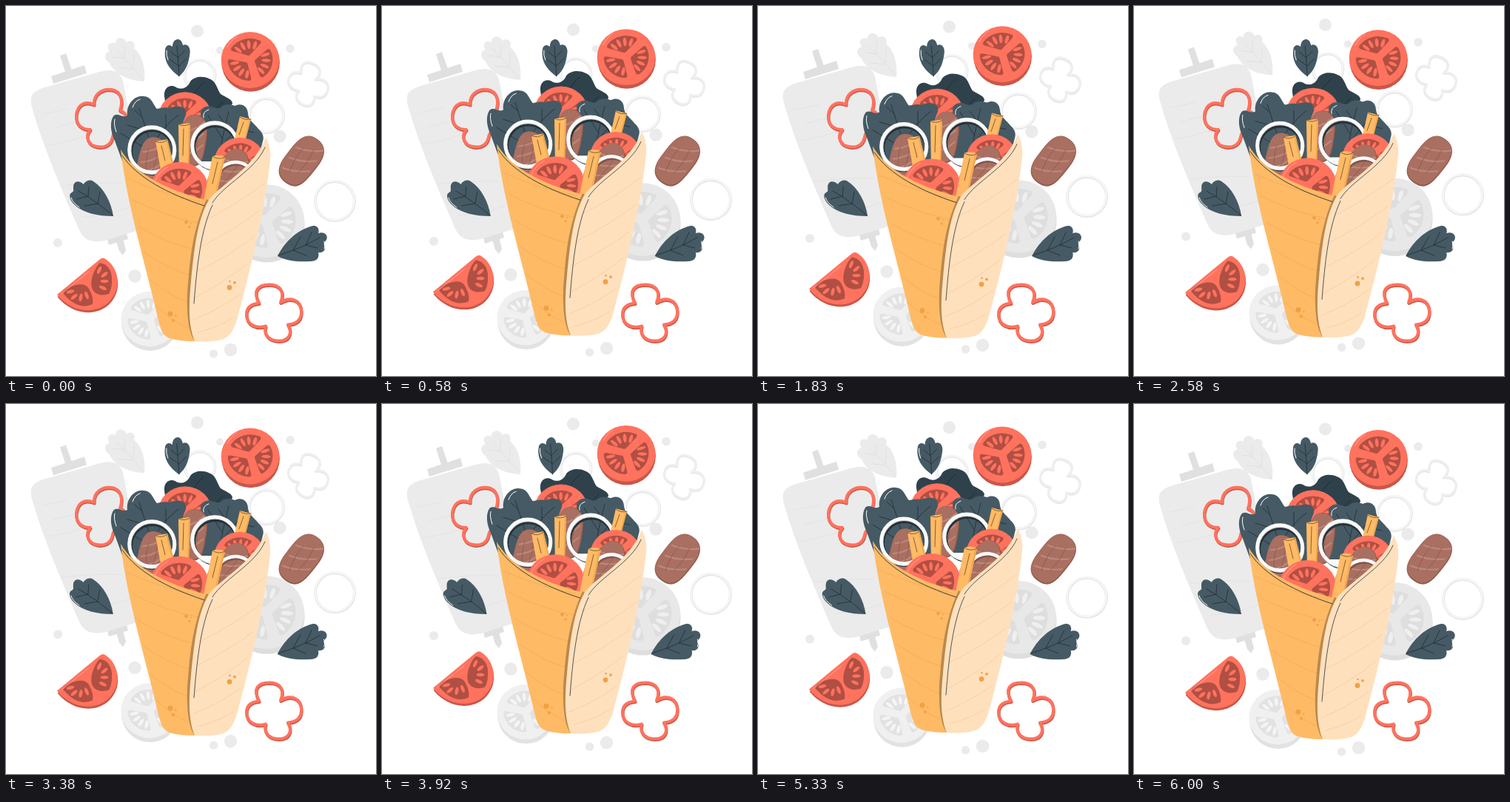
An HTML page that plays this animation: 500 px wide and 500 px high, repeating every 6.04 s.

```html
<!DOCTYPE html>
<html lang="en">
<head>
<meta charset="utf-8">
<title>Wrap</title>
<style>
  html, body { margin: 0; width: 100%; height: 100%; overflow: hidden; background: #fff; }
  svg { display: block; width: 100%; height: 100%; }
</style>
</head>
<body>
<svg id="stage" viewBox="0 0 500 500"></svg>
<script>
const RED = { rim: '#c9574a', face: '#ff725e', cell: '#b04f43', seed: '#ff725e' };
const GREY = { rim: '#dedede', face: '#e8e8e8', cell: '#dedede', seed: '#efefef' };
const PALE = { rim: '#e2e2e2', face: '#f0f0f0', cell: '#e2e2e2', seed: '#f5f5f5' };
const LEAF = '#455a64', DARK = '#263238', MEAT = '#a96f61';

const fill = (d, color, extra = '') => `<path d="${d}" fill="${color}" ${extra}/>`;
const line = (d, color, width = 1, extra = '') =>
  `<path d="${d}" fill="none" stroke="${color}" stroke-width="${width}" stroke-linecap="round" stroke-linejoin="round" ${extra}/>`;
const dot = (x, y, r, color) => `<circle cx="${x}" cy="${y}" r="${r}" fill="${color}"/>`;
const dots = (list, color) => list.map(([x, y, r]) => dot(x, y, r, color)).join('');
const hoop = (x, y, r, color, width) =>
  `<circle cx="${x}" cy="${y}" r="${r}" fill="none" stroke="${color}" stroke-width="${width}"/>`;
const group = (content, id) => `<g id="${id}">${content}</g>`;

// One seed chamber, pointing along +x in a tomato of radius 1.
function chamber(c, angle) {
  const seeds = [-33, -11, 11, 33].map(a =>
    `<ellipse cx=".55" rx=".16" ry=".06" transform="rotate(${a})" fill="${c.seed}"/>`).join('');
  return `<g transform="rotate(${angle})">
    <path d="M.24 0L.53 -.45A.7 .7 0 0 1 .53 .45Z" fill="${c.cell}" stroke="${c.cell}" stroke-width=".16" stroke-linejoin="round"/>${seeds}</g>`;
}

function tomato(x, y, r, turn, c, depth = 4) {
  const cells = [0, 120, 240].map(a => chamber(c, turn + a)).join('');
  return dot(x + .6, y + depth, r, c.rim) +
    `<ellipse cx="${x}" cy="${y - 1}" rx="${r}" ry="${r * .965}" fill="${c.face}"/>` +
    `<g transform="translate(${x} ${y - 1.5}) scale(${r} ${r * .94})">${cells}</g>`;
}

const CLOVER = 'M-20 -13C-29 -30 -22 -38 -6 -38C9 -38 15 -28 9 -14C22 -22 36 -18 37 -3C38 10 30 15 19 16' +
  'C26 28 20 38 7 38C-8 38 -14 28 -11 18C-24 22 -37 16 -37 2C-37 -8 -30 -12 -20 -13Z';
const SIDE_PEPPER = 'M119 133C118 119 130 111 143 113C155 115 159 127 154 141C168 146 170 169 153 171' +
  'C145 169 145 173 144 177C142 188 133 192 123 190C111 188 106 176 114 167C102 167 94 160 95 147C97 133 106 128 119 133Z';
const outline = (d, light, shade) =>
  line(d, shade, 4.2, 'transform="translate(.5 1.4)"') + line(d, light, 4);
const pepper = (x, y, turn, scale, light, shade) =>
  `<g transform="translate(${x} ${y}) rotate(${turn}) scale(${scale})">${outline(CLOVER, light, shade)}</g>`;

const paleRing = (x, y, r) => hoop(x, y + .6, r, '#e6e6e6', 4) + hoop(x - .3, y - .4, r, '#f6f6f6', 2.6);
const onion = (x, y, r) => hoop(x + 1, y + 3, r - 1, DARK, 5) + hoop(x + .4, y + .9, r, '#dcdcdc', 5) + hoop(x, y, r, '#fafafa', 4.4);

const leaf = (shape, veins, color = LEAF, vein = DARK, glint = '') =>
  fill(shape, color) + line(veins, vein, .9) + (glint && line(glint, '#fff', 1));

function meat(x, y, length, width, turn) {
  const w = width / 2, h = length / 2;
  const body = `M0 ${-h}C${w * .85} ${-h} ${w * 1.1} ${-h * .6} ${w} ${-h * .1}C${w * .9} ${h * .55} ${w * .85} ${h} 0 ${h}` +
    `C${-w * .85} ${h} ${-w * 1.1} ${h * .65} ${-w} ${h * .1}C${-w * .95} ${-h * .5} ${-w * .85} ${-h} 0 ${-h}Z`;
  const stripes = [-.5, -.05, .4].map(k =>
    line(`M${-w * .75} ${h * k + 7}Q${w * .1} ${h * k + 3} ${w * .75} ${h * k - 9}`, '#ba887b', 2.2)).join('');
  const grain = line(`M${-w * .35} ${-h * .45}Q${-w * .5} 0 ${-w * .25} ${h * .6}M${w * .25} ${-h * .6}Q${w * .4} 0 ${w * .2} ${h * .45}`, '#83544a', .6);
  return `<g transform="translate(${x} ${y}) rotate(${turn})">` +
    fill(body, '#8f594d') + fill(body, MEAT, 'transform="translate(-.6 -.6) scale(.97)"') + stripes + grain + '</g>';
}

const fry = (front, side, top) =>
  fill(front, '#ffba66') + fill(side, '#efa94f') + line(top, '#6b4a20', .8);

function background() {
  const skewer =
    fill('M73 67L81 64L90 90L81 92Z', '#e0e0e0') +
    fill('M61 95L106 80L109 91L64 105Z', '#e0e0e0') +
    fill('M149 318L158 315L162 330L158 337L153 331Z', '#e0e0e0') +
    fill('M137 315L163 307L165 315L139 323Z', '#e0e0e0') +
    fill('M35 137C31 121 36 116 49 111L126 89C144 84 153 88 158 101L192 276C193 292 189 299 176 304L134 317C115 321 105 316 99 303C75 248 50 190 35 137Z', '#ebebeb') +
    line('M56 188Q85 184 119 172M76 243Q110 238 157 239M63 165L92 158M104 285Q134 284 167 272M50 146L83 139', '#e2e2e2', .9);
  const paleLeaf = leaf(
    'M187 102C165 101 146 92 140 77C132 72 132 64 140 61C134 53 141 47 148 51C147 42 159 40 163 49C170 44 176 51 173 57C184 66 189 84 187 102Z',
    'M185 99Q166 77 149 59M160 70L160 55M172 83L173 65M160 71L145 69M173 85L153 83', '#ebebeb', '#dfdfdf');
  return skewer + paleLeaf +
    dots([[258.5, 34, 8.5], [289, 60, 5], [384, 57.5, 5.8], [370, 176, 8.6], [70, 320, 6],
      [174, 365, 8.7], [303.5, 464.5, 8.7], [280.5, 470, 5.8]], '#ebebeb') +
    tomato(352, 291.5, 51, -106, GREY) + tomato(194, 424, 38.5, -106, PALE, 3.5) +
    pepper(408.5, 105.5, 24, .74, '#efefef', '#e3e3e3') +
    paleRing(444.5, 263, 26.5) + paleRing(352, 147.5, 23) + paleRing(262, 93, 20.5);
}

function tomatoes() {
  const slice = 'M69 390L126 343Q131 338 136 343C155 357 155 385 139 400C120 418 88 414 69 390Z';
  const seed = (x, y, a) => `<ellipse cx="${x}" cy="${y}" rx="5.5" ry="2.3" transform="rotate(${a} ${x} ${y})" fill="${RED.seed}"/>`;
  return tomato(330, 74, 39.3, -106, RED, 2.4) +
    fill(slice, RED.rim, 'transform="translate(.6 3)"') + fill(slice, RED.face) +
    fill('M77 388Q80 380 97 376.5Q108 375 112 382Q119 394 117 403Q97 412 77 388Z', RED.cell) +
    fill('M127 347Q141 350 143 366Q144 380 139 389Q126 393 119 386Q113 380 116.5 366Q121 352 127 347Z', RED.cell) +
    seed(87, 386, -15) + seed(92, 393, -40) + seed(101, 394, -78) + seed(109, 391, 68) +
    seed(126, 357, -65) + seed(133, 363, -38) + seed(133, 372, 0) + seed(131, 381, 25) +
    line('M75 389L112 359M299 56Q304 46 312 41', '#ffa89b', .9);
}

function leaves() {
  return leaf(
    'M234 95C222 87 213 75 215 60C215 53 221 51 225 55C225 43 237 41 239 53C244 50 250 55 248.5 64C247 76 244 87 234 95Z',
    'M234 95Q233 75 231 54M233 70L223 62M234 81L221 72M233 69L241 61M234 81L244 71', LEAF, DARK, 'M217 60Q216 66 219 73') +
  leaf(
    'M145 284C142 264 132 246 118 237C112 233 106 238 105 241C99 235 91 236 91 245C91 250 92 250 89 252C84 254 86 262 92 268C104 280 124 284 145 284Z',
    'M144 283Q121 263 98 250M111 257L112 244M124 267L127 251M111 257L95 261M124 267L106 270', LEAF, DARK, 'M88 259Q90 266 99 272') +
  leaf(
    'M367 338C377 318 394 302 415 297C421 296 424 302 422 307C430 304 436 310 433 316C429 321 429 321 431 325C432 331 427 334 422 333C424 340 420 345 412 345C396 346 380 345 367 338Z',
    'M368 337Q398 328 424 313M388 330L398 312M405 323L413 306M388 330L405 337M405 323L421 327', LEAF, DARK, 'M430 318Q432 323 430 328');
}

function filling() {
  const lettuceBack = leaf(
    'M218 150L214 122C213 110 222 105 230 110C238 114 246 110 249 102C256 94 267 95 274 98C284 101 285 112 290 119C298 124 306 126 306 132L300 140L280 160Z',
    'M250 130Q255 112 267 104M280 142L293 130', '#2f424c', '#1d2a30');
  const lettuceLeft = leaf(
    'M158 212L147 182C139 165 142 152 146 148C152 144 157 152 164 148C162 132 175 120 186 122C197 122 199 134 204 139C212 137 218 137 222 138C232 133 242 136 243 143C245 150 235 156 242 164L236 225Z',
    'M205 213Q192 176 180 138M197 190Q211 164 233 147M191 169L164 161M184 150L174 141M201 200L155 172M216 165L216 147', LEAF, DARK,
    'M147 153Q145 159 149 170M171 137Q174 128 181 126');
  const lettuceRight = leaf(
    'M258 210L264 150C260 138 270 134 278 136C283 138 284 138 289 138C297 130 306 134 309 135C320 130 327 137 327 146C328 155 336 159 341 166C347 171 349 177 347 183L340 210Z',
    'M287 212Q292 175 301 143M293 180L273 148M297 161L287 147M291 190Q313 164 324 150M315 167L335 171', LEAF, DARK, 'M267 151Q265 143 274 140');
  return lettuceBack + tomato(242, 152.5, 36.5, -102, RED) + lettuceLeft + lettuceRight +
    meat(253, 182, 70, 36, 4) + meat(197, 208, 62, 36, 10) +
    onion(197, 194, 30.5) + onion(282, 188, 30.5) +
    fry('M233 160L249 158L246 230L234 230Z', 'M247 159L249 158L247 230L245 230Z', 'M233 160Q241 164 249 159M240 166L239 202') +
    fry('M316 149L331 153L322 184L309 180Z', 'M329 153L331 153L323 184L321 184Z', 'M316 150Q323 155 331 153M321 157L315 174') +
    tomato(316, 212, 34.5, -98, RED) +
    meat(300, 224, 70, 36, 36) +
    line('M284 244A27 27 0 0 1 330 220', '#83544a', 3, 'transform="translate(1 2.6)"') +
    line('M283 240A27 27 0 0 1 328 218', '#fafafa', 4.6) +
    fry('M202 183L218 180L229 224L210 226Z', 'M216 181L218 180L228 220L226 221Z', 'M202 183Q211 187 218 181M210 189L215 209') +
    tomato(234.5, 250, 39.5, -103, RED) +
    line('M201 238Q207 223 219 217', '#ffa89b', .9) +
    fry('M279 203Q288 200 296 204L284 258L266 268Z', 'M293.5 204L296 204L284 258L281.5 260Z', 'M279 203Q287 209 296 204M286 211L279 240');
}

function tortilla() {
  const left = 'M155 194C171 222 208 247 274 263L262 300L250 390L257 453C238 453 224 451 217 447C211 443 209 436 206 425C189 350 163 268 155 194Z';
  const flap = 'M273 264C285 244 335 220 351 178C356 186 358 197 357 208C351 270 332 350 313 421C308 438 303 446 294 450C282 454 267 454 255 453C246 431 247 403 250 372C254 331 258 291 273 264Z';
  const folds = [[164, 233, 262], [171, 262, 259], [179, 298, 254], [187, 333, 249], [195, 370, 247], [202, 404, 246]];
  const flapFolds = [[272, 288, 350, 239], [264, 325, 343, 276], [259, 358, 335, 312], [255, 394, 326, 348], [253, 424, 317, 389], [259, 441, 307, 421]];
  return fill(left, '#ffba66') +
    folds.map(([x, y, end]) => line(`M${x} ${y}Q${(x + end) / 2} ${y + 22} ${end} ${y + 31}`, '#f0ab57', .8)).join('') +
    fill('M271 261C250 306 248 352 245 389C244 420 247 442 255 453L260 420L263 300L276 264Z', '#b9894d') +
    fill(flap, '#ffe0bd') +
    flapFolds.map(([x, y, u, v]) => line(`M${x} ${y}Q${(x + u) / 2 + 4} ${(y + v) / 2 + 3} ${u} ${v}`, '#f6cb9c', .8)).join('') +
    line('M157 202C177 232 219 254 268 270', DARK, .9) +
    line('M350 191C337 222 293 242 279 266', DARK, .8) +
    line('M279 269C263 303 258 352 254 402', DARK, .8) +
    dots([[243.5, 292, 2.4], [248, 298.5, 1.6], [250, 293.5, 1], [222, 416, 3.5], [226, 425, 2], [229.5, 418.5, 1.2],
      [302, 380.5, 3.4], [309, 373.8, 1.9], [302.5, 372, 1.3]], '#f2a044');
}

const stage = document.getElementById('stage');
stage.innerHTML = group(background(), 'backdrop') + group(tomatoes(), 'tomatoes') +
  outline(SIDE_PEPPER, RED.face, RED.rim) + pepper(362, 414.5, 0, 1, RED.face, RED.rim) +
  meat(399.5, 209.5, 73, 44, 33) + group(leaves(), 'leaves') + group(filling() + tortilla(), 'wrap');

const move = (id, x, y) =>
  document.getElementById(id).setAttribute('transform', `translate(${x.toFixed(3)} ${y.toFixed(3)})`);

// Linear rise of 10 and return.
function floatY(time, period) {
  const phase = time % period / period;
  return -10 * (1 - Math.abs(1 - 2 * phase));
}

const SHAKE = [0, -1, 2, -4, 4, -4, 4, -4, 2, -1, 0];
function shakeX(time, period) {
  const position = time % period / period * 10, i = Math.floor(position);
  return SHAKE[i] + (SHAKE[i + 1] - SHAKE[i]) * (position - i);
}

const LOOP = 6040, CYCLE = 6000;
function render(now) {
  const time = Math.min(now % LOOP, CYCLE);
  move('backdrop', 0, floatY(time, 6000));
  move('tomatoes', 0, floatY(time, 3000));
  move('wrap', 0, floatY(time, 1500));
  move('leaves', shakeX(time, 3000), 0);
}

const start = performance.now();
function tick() {
  render(performance.now() - start);
  requestAnimationFrame(tick);
}
tick();
</script>
</body>
</html>
```
